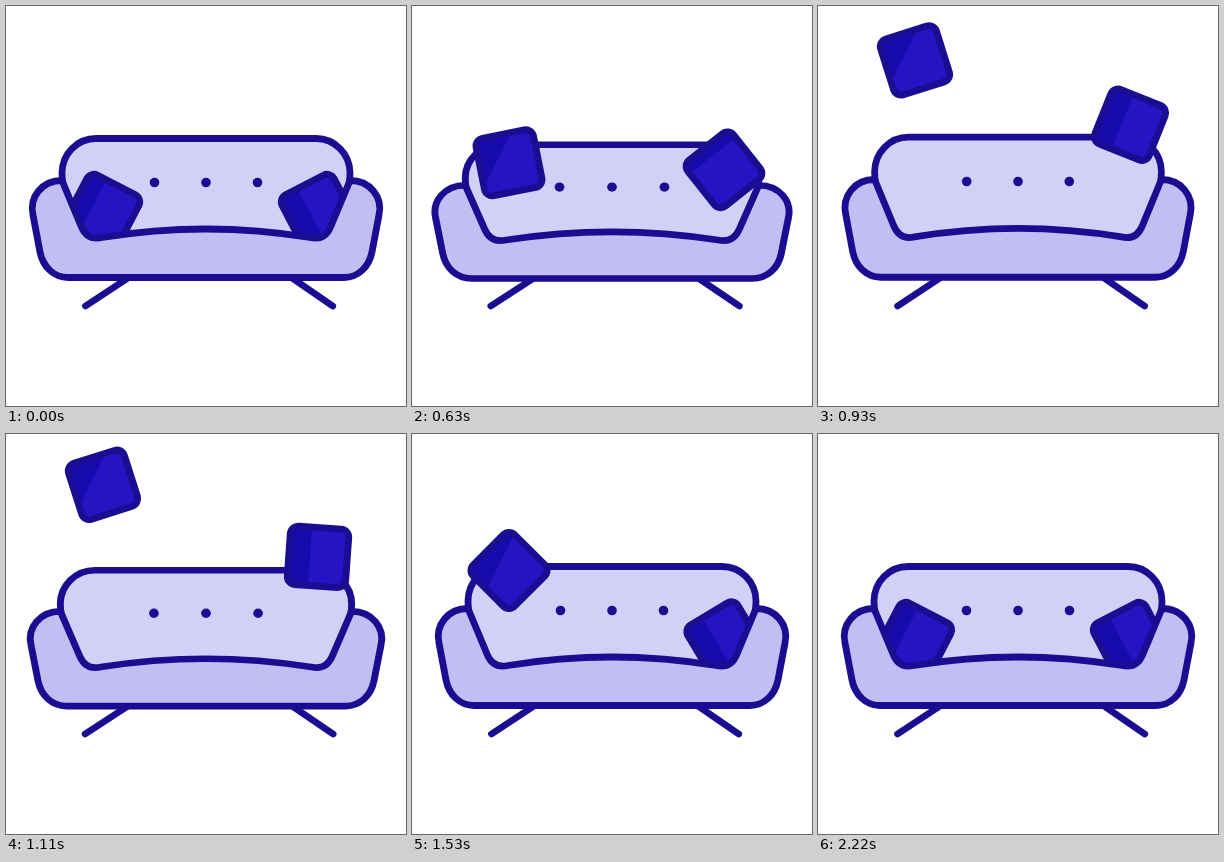
Recreate the animation shown at these times as an HTML page. Size 400 by 400 pixels, loop 2250 ms.

```html
<!DOCTYPE html>
<html lang="en">
<head>
<meta charset="utf-8">
<title>Sofa</title>
<style>
html, body { margin: 0; width: 100%; height: 100%; overflow: hidden; background: #fff; }
svg { display: block; width: 100vw; height: 100vh; }
.line { stroke: #1b0d91; stroke-width: 6.8; stroke-linecap: round; stroke-linejoin: round; }
</style>
</head>
<body>
<svg viewBox="0 0 400 400">
  <defs>
    <clipPath id="clipLeft"><rect x="-29.3" y="-29.3" width="58.6" height="58.6" rx="8"/></clipPath>
    <clipPath id="clipRight"><rect x="-29.3" y="-29.3" width="58.6" height="58.6" rx="8"/></clipPath>
  </defs>
  <path id="legs" class="line" fill="none"/>
  <g class="body">
    <path class="line" fill="#d3d0f8" d="M57 178Q56 172 56 167A34 34.5 0 0 1 90 132.5H310A34 34.5 0 0 1 344 167Q344 172 343 178L322 232Q200 250 78 232Z"/>
    <g fill="#1b0d91">
      <circle cx="148.5" cy="176.5" r="4.8"/>
      <circle cx="200" cy="176.5" r="4.8"/>
      <circle cx="251.5" cy="176.5" r="4.8"/>
    </g>
  </g>
  <g id="pillows"></g>
  <g class="body">
    <path class="line" fill="#c1bef4" d="M56 174.5C36 174.5 23 191 27 209L34 246C37 261 48 271.5 62 271.5H338C352 271.5 363 261 366 246L373 209C377 191 364 174.5 344 174.5L325 220Q319 235 304 231.5Q200 214.5 96 231.5Q81 235 75 220Z"/>
  </g>
</svg>
<script>
const LOOP = 2250, HOLD = 330, SEAT_Y = 205;
const clamp = v => Math.max(0, Math.min(1, v));
const mix = (a, b, u) => a + (b - a) * u;
const span = (t, a, b) => clamp((t - a) / (b - a));
const easeOut = (u, power) => 1 - (1 - u) ** power;
const sineEase = u => (1 - Math.cos(Math.PI * u)) / 2;
const setTransform = (el, value) => el.setAttribute('transform', value);

// Time and sideways bulge of the sofa in pixels.
const BULGE = [[285, 0], [480, 6], [850, -1.5], [1110, 2], [1440, 0]];

function bulgeAt(t) {
  if (t < HOLD) return 0;
  for (let i = 1; i < BULGE.length; i++) {
    const [t0, a] = BULGE[i - 1], [t1, b] = BULGE[i];
    if (t < t1) return mix(a, b, sineEase(span(t, t0, t1)));
  }
  return 0;
}

function wobble(t, land) {
  const d = t - land;
  return d < 0 ? 0 : -6 * Math.exp(-d / 200) * Math.sin(2 * Math.PI * d / 400);
}

function liftAt(t, { launch, apex, land, height, up, down }) {
  return t < apex
    ? height * easeOut(span(t, launch, apex), up)
    : height * (1 - span(t, apex, land) ** down);
}

const pillows = [
  {
    id: 'Left', x: 97, launch: 562, apex: 1050, land: 1644, height: 154.5, up: 2.6, down: 2.78,
    angle: t => t < 1050
      ? mix(27.5, -17.5, easeOut(span(t, 450, 1050), 5.5))
      : mix(-17.5, -62.5, span(t, 1050, 1644) ** 2.32),
    shadeAngle: () => 27,
    shadeEdge: () => -11.5
  },
  {
    id: 'Right', x: 312, launch: 482, apex: 1005, land: 1420, height: 88, up: 2, down: 2,
    angle: t => mix(62.5, -27.5, span(t, 520, 1430)),
    shadeAngle(t, angle) {
      return mix(-27.5, angle, sineEase(span(t, 480, 630)));
    },
    shadeEdge: t => -8 - 10 * Math.exp(-(((t - 630) / 100) ** 2))
  }
];

const layer = document.getElementById('pillows');
for (const p of pillows) {
  layer.insertAdjacentHTML('beforeend', `<g>
    <g clip-path="url(#clip${p.id})">
      <g class="shade"><rect x="-60" y="-60" width="120" height="120" fill="#180bae"/>
      <rect y="-60" width="120" height="120" fill="#2414c4"/></g>
    </g>
    <rect class="line" x="-29.3" y="-29.3" width="58.6" height="58.6" rx="8" fill="none"/>
  </g>`);
  p.group = layer.lastElementChild;
  p.shade = p.group.querySelector('.shade');
  p.light = p.shade.lastElementChild;
  p.outline = p.group.lastElementChild;
  p.clip = document.querySelector(`#clip${p.id} rect`);
}

const bodies = document.querySelectorAll('.body');
const legs = document.getElementById('legs');

function draw(t) {
  const bulge = bulgeAt(t), stretch = bulge / 174;
  const squash = 1 - 1.95 * stretch;
  bodies.forEach(el => setTransform(el,
    `translate(200 300) scale(${1 + stretch} ${squash}) translate(-200 -300)`));

  const foot = 0.2 * bulge;
  legs.setAttribute('d', `M122 272L${79.5 - foot} 300M286 272L${326.7 + foot} 300`);

  for (const p of pillows) {
    const lift = liftAt(t, p);
    const sink = (300 - SEAT_Y) * (1 - squash) * (1 - lift / p.height);
    const angle = p.angle(t) + wobble(t, p.land);
    setTransform(p.group, `translate(${p.x} ${SEAT_Y - lift + sink})`);
    setTransform(p.outline, `rotate(${angle})`);
    setTransform(p.clip, `rotate(${angle})`);
    setTransform(p.shade, `rotate(${p.shadeAngle(t, angle)})`);
    p.light.setAttribute('x', p.shadeEdge(t));
  }
}

const start = performance.now();
function tick() {
  draw((performance.now() - start) % LOOP);
  requestAnimationFrame(tick);
}
tick();
</script>
</body>
</html>
```
